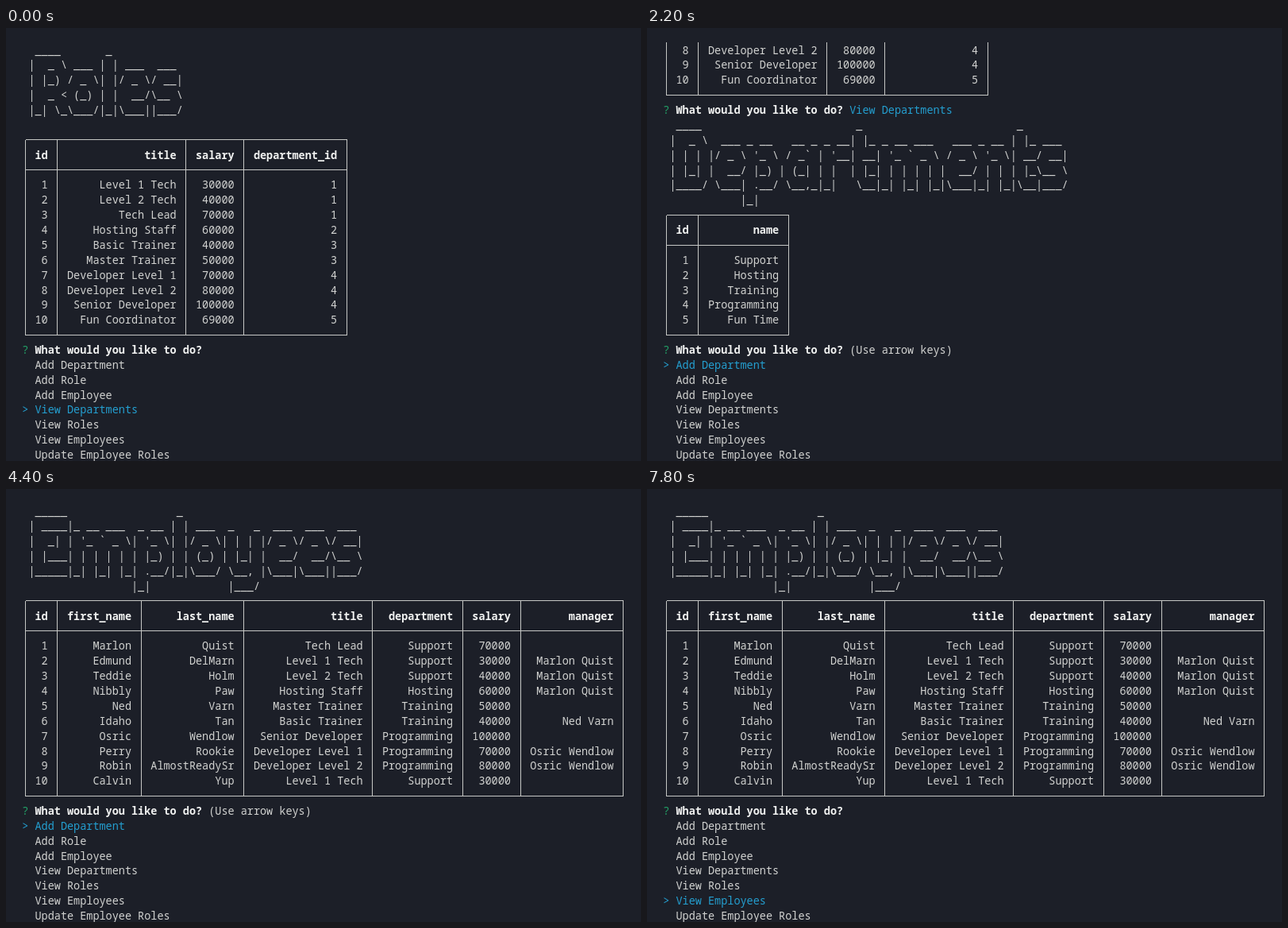
Animation of 800 by 545 pixels, one loop 8 s. Source, as an HTML page:

```html
<!DOCTYPE html>
<html lang="en">
<head>
<meta charset="utf-8">
<title>Employee tracker</title>
<style>
  html, body { margin: 0; width: 100%; height: 100%; overflow: hidden; background: #1c1f28; }
  svg { display: block; width: 800px; height: 545px; }
  text {
    font: 13.5px "Noto Sans Mono", "DejaVu Sans Mono", monospace;
    font-variant-ligatures: none;
    fill: #d2d3d1;
  }
  .bold { font-weight: 700; fill: #f0f1f0; }
  .green { fill: #23a067; }
  .blue { fill: #249fd0; }
  path { fill: none; stroke: #c6c7c5; stroke-width: 1; shape-rendering: crispEdges; }
</style>
</head>
<body>
<svg id="screen" viewBox="0 0 800 545"></svg>

<script type="text/plain" id="roles-banner">
  ____       _
 |  _ \ ___ | | ___  ___
 | |_) / _ \| |/ _ \/ __|
 |  _ < (_) | |  __/\__ \
 |_| \_\___/|_|\___||___/
</script>
<script type="text/plain" id="departments-banner">
  ____                        _                        _
 |  _ \  ___ _ __   __ _ _ __| |_ _ __ ___   ___ _ __ | |_ ___
 | | | |/ _ \ '_ \ / _` | '__| __| '_ ` _ \ / _ \ '_ \| __/ __|
 | |_| |  __/ |_) | (_| | |  | |_| | | | | |  __/ | | | |_\__ \
 |____/ \___| .__/ \__,_|_|   \__|_| |_| |_|\___|_| |_|\__|___/
            |_|
</script>
<script type="text/plain" id="employees-banner">
  _____                 _
 | ____|_ __ ___  _ __ | | ___  _   _  ___  ___  ___
 |  _| | '_ ` _ \| '_ \| |/ _ \| | | |/ _ \/ _ \/ __|
 | |___| | | | | | |_) | | (_) | |_| |  __/  __/\__ \
 |_____|_| |_| |_| .__/|_|\___/ \__, |\___|\___||___/
                 |_|            |___/
</script>

<script>
const LOOP = 8000;
const LEFT = 20.3, TOP = 27.7, CELL = 8.1, LINE = 18.87, BASELINE = 4.9;
const PROMPT_ROW = 20;
const QUESTION = 'What would you like to do?';
const MENU = ['Add Department', 'Add Role', 'Add Employee', 'View Departments',
  'View Roles', 'View Employees', 'Update Employee Roles'];

const parse = source => source.trim().split('\n').map(line => line.trim().split(','));

const ROLES = parse(`
  id,title,salary,department_id
  1,Level 1 Tech,30000,1
  2,Level 2 Tech,40000,1
  3,Tech Lead,70000,1
  4,Hosting Staff,60000,2
  5,Basic Trainer,40000,3
  6,Master Trainer,50000,3
  7,Developer Level 1,70000,4
  8,Developer Level 2,80000,4
  9,Senior Developer,100000,4
  10,Fun Coordinator,69000,5`);

const DEPARTMENTS = parse(`
  id,name
  1,Support
  2,Hosting
  3,Training
  4,Programming
  5,Fun Time`);

const EMPLOYEES = parse(`
  id,first_name,last_name,title,department,salary,manager
  1,Marlon,Quist,Tech Lead,Support,70000,
  2,Edmund,DelMarn,Level 1 Tech,Support,30000,Marlon Quist
  3,Teddie,Holm,Level 2 Tech,Support,40000,Marlon Quist
  4,Nibbly,Paw,Hosting Staff,Hosting,60000,Marlon Quist
  5,Ned,Varn,Master Trainer,Training,50000,
  6,Idaho,Tan,Basic Trainer,Training,40000,Ned Varn
  7,Osric,Wendlow,Senior Developer,Programming,100000,
  8,Perry,Rookie,Developer Level 1,Programming,70000,Osric Wendlow
  9,Robin,AlmostReadySr,Developer Level 2,Programming,80000,Osric Wendlow
  10,Calvin,Yup,Level 1 Tech,Support,30000,`);

const screen = document.getElementById('screen');
const midX = col => Math.floor(LEFT + (col + 0.5) * CELL) + 0.5;
const midY = row => Math.floor(TOP + row * LINE) + 0.5;

function add(tag, attributes) {
  const node = document.createElementNS('http://www.w3.org/2000/svg', tag);
  for (const key in attributes) node.setAttribute(key, attributes[key]);
  return screen.appendChild(node);
}

// Non-breaking spaces keep the character grid intact.
function write(row, col, string, style = '') {
  add('text', { x: LEFT + col * CELL, y: TOP + row * LINE + BASELINE, class: style })
    .textContent = string.replaceAll(' ', '\u00a0');
}

function banner(name, row) {
  const lines = document.getElementById(name + '-banner').textContent.split('\n').slice(1);
  lines.forEach((line, i) => write(row + i, 0, line));
}

// Rows scrolled above the screen (negative) are skipped.
function table(records, row) {
  const widths = records[0].map((_, i) => Math.max(...records.map(cells => cells[i].length)));
  const edges = widths.reduce((list, width) => [...list, list.at(-1) + width + 3], [0]);
  const bottom = row + records.length + 2;

  records.forEach((cells, r) => {
    const y = row + (r ? r + 2 : 1);
    if (y < 0) return;
    cells.forEach((cell, i) =>
      write(y, edges[i + 1] - 1 - cell.length, cell, r ? '' : 'bold'));
  });

  const rules = [row, row + 2, bottom].filter(y => y >= 0)
    .map(y => `M${midX(0)} ${midY(y)}H${midX(edges.at(-1))}`);
  const start = row < 0 ? TOP - LINE / 2 : midY(row);
  const bars = edges.map(col => `M${midX(col)} ${start}V${midY(bottom)}`);
  add('path', { d: [...rules, ...bars].join('') });
}

function question(row) {
  write(row, 0, '?', 'green');
  write(row, 2, QUESTION, 'bold');
}

function prompt(selected) {
  question(PROMPT_ROW);
  if (selected === 0) write(PROMPT_ROW, 29, '(Use arrow keys)');
  MENU.forEach((item, i) => {
    const active = i === selected;
    write(PROMPT_ROW + 1 + i, 0, (active ? '> ' : '  ') + item, active ? 'blue' : '');
  });
}

const views = {
  roles() {
    banner('roles', 0);
    table(ROLES, 6);
  },
  departments() {
    table(ROLES, -10);
    question(4);
    write(4, 29, 'View Departments', 'blue');
    banner('departments', 5);
    table(DEPARTMENTS, 11);
  },
  employees() {
    banner('employees', 0);
    table(EMPLOYEES, 6);
  }
};

// start time, view, selected menu item (null: prompt cleared)
const STEPS = [
  [0, 'roles', 3],
  [1200, 'departments', 0],
  [2400, 'departments', 1],
  [2600, 'departments', 2],
  [2800, 'departments', null],
  [3000, 'departments', 4],
  [3200, 'departments', 5],
  [4400, 'employees', 0],
  [6800, 'employees', 1],
  [7000, 'employees', 2],
  [7200, 'employees', 3],
  [7400, 'employees', 4],
  [7600, 'employees', 5]
];

let shown = null;
function show(time) {
  const step = STEPS.findLast(([start]) => start <= time);
  if (step === shown) return;
  shown = step;
  const [, view, selected] = step;
  screen.replaceChildren();
  views[view]();
  if (selected !== null) prompt(selected);
}

const origin = performance.now();
function tick() {
  show((performance.now() - origin) % LOOP);
  requestAnimationFrame(tick);
}
tick();
</script>
</body>
</html>
```
